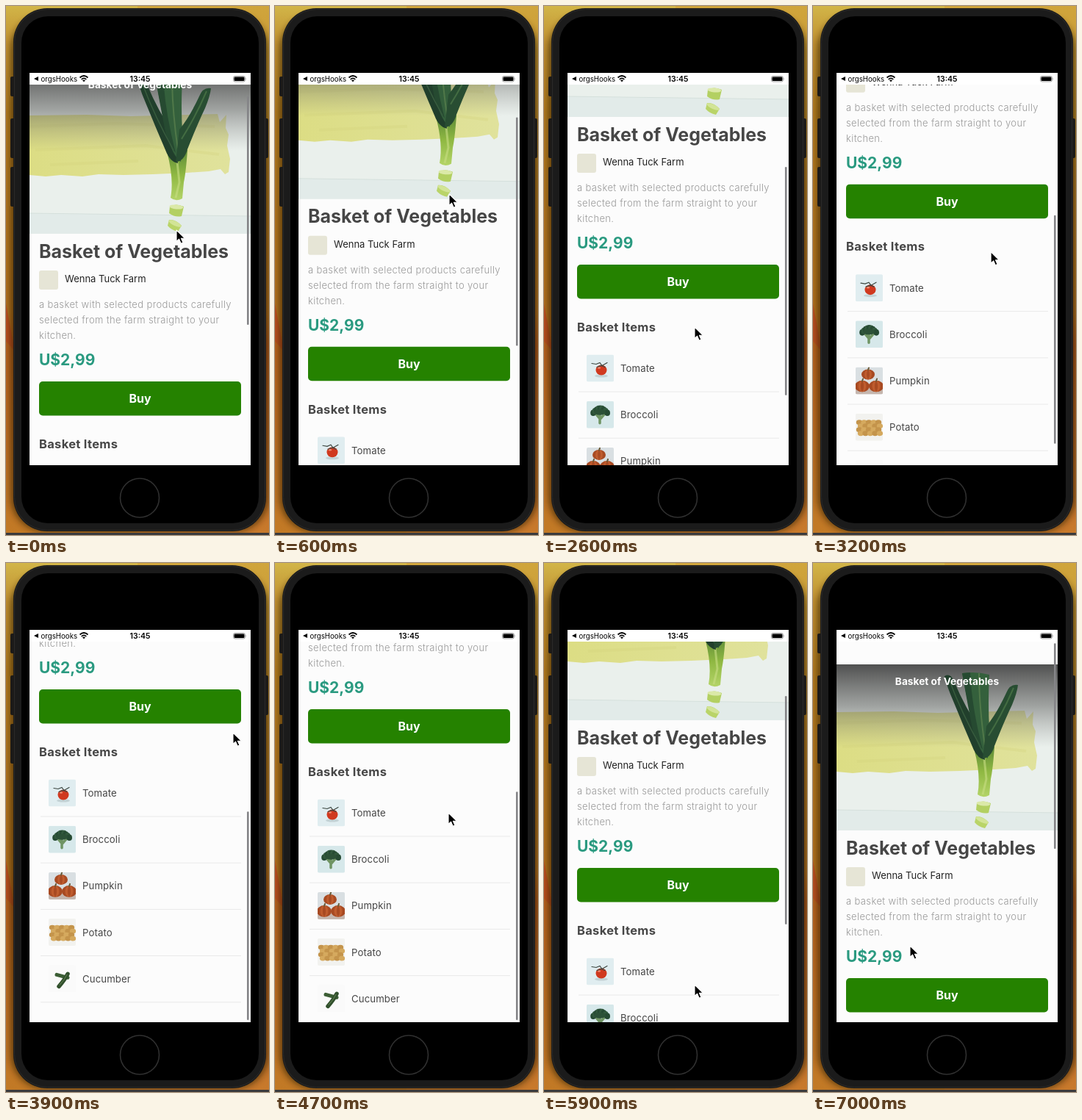
These frames come from a looping animation (358 px wide and 720 px high, 7100 ms). An HTML page:

```html
<!DOCTYPE html>
<html lang="en">
<head>
<meta charset="utf-8">
<title>Basket of Vegetables</title>
<style>
html, body { margin: 0; width: 100%; height: 100%; overflow: hidden; background: #000; }
svg { display: block; width: 358px; height: 720px; }
text { font-family: Inter, sans-serif; }
</style>
</head>
<body>
<svg viewBox="0 0 358 720" xmlns="http://www.w3.org/2000/svg">
  <defs>
    <linearGradient id="wallL" x1="0" y1="0" x2="0" y2="1">
      <stop offset="0" stop-color="#d2b548"/><stop offset=".07" stop-color="#c09030"/>
      <stop offset=".2" stop-color="#b07a1e"/><stop offset=".58" stop-color="#b06f1c"/>
      <stop offset=".63" stop-color="#b5601c"/><stop offset="1" stop-color="#c27a26"/>
    </linearGradient>
    <linearGradient id="wallR" x1="0" y1="0" x2="0" y2="1">
      <stop offset="0" stop-color="#d0a53c"/><stop offset=".3" stop-color="#b98226"/>
      <stop offset=".58" stop-color="#b87422"/><stop offset=".64" stop-color="#b3591f"/>
      <stop offset="1" stop-color="#c87a2c"/>
    </linearGradient>
    <linearGradient id="shade" x1="0" y1="0" x2="0" y2="1">
      <stop offset="0" stop-color="#484848" stop-opacity=".95"/>
      <stop offset=".25" stop-color="#555" stop-opacity=".5"/>
      <stop offset=".5" stop-color="#777" stop-opacity="0"/>
    </linearGradient>
    <linearGradient id="stem" x1="0" y1="0" x2="0" y2="1">
      <stop offset="0" stop-color="#5d8a38"/><stop offset=".5" stop-color="#8fb842"/>
      <stop offset="1" stop-color="#b4d468"/>
    </linearGradient>
    <linearGradient id="paint" x1="0" y1="0" x2="1" y2="0">
      <stop offset="0" stop-color="#dcdd84"/><stop offset="1" stop-color="#e0e29c"/>
    </linearGradient>
    <filter id="soft" x="-20%" y="-20%" width="140%" height="140%"><feGaussianBlur stdDeviation="4"/></filter>
    <clipPath id="view"><rect x="32" y="107" width="301" height="518"/></clipPath>
    <clipPath id="photo"><rect x="32" y="84" width="301" height="226"/></clipPath>
    <clipPath id="thumb"><rect width="37" height="37" rx="2"/></clipPath>
  </defs>

  <!-- wallpaper -->
  <rect width="179" height="720" fill="url(#wallL)"/>
  <rect x="179" width="179" height="720" fill="url(#wallR)"/>
  <path d="M0 405L12 470L0 456Z" fill="#b84e1e"/>
  <rect x="6" y="12" width="352" height="704" rx="48" fill="#2a1a04" opacity=".6" filter="url(#soft)"/>
  <rect y="717" width="358" height="3" fill="#3a3a3c"/>

  <!-- phone -->
  <g fill="#1c1a18">
    <rect x="6" y="96" width="6" height="27" rx="2"/>
    <rect x="6" y="153" width="6" height="54" rx="2"/>
    <rect x="6" y="219" width="6" height="54" rx="2"/>
    <rect x="352" y="153" width="5" height="54" rx="2"/>
  </g>
  <rect x="10" y="3" width="344" height="712" rx="46" fill="#1b1b1b"/>
  <rect x="11.500" y="4.500" width="341" height="709" rx="45" fill="none" stroke="#2b2a29"/>
  <rect x="21" y="14" width="323" height="690" rx="36" fill="#000"/>
  <circle cx="182" cy="669.500" r="26.500" fill="#000" stroke="#303030" stroke-width="1.600"/>

  <rect x="32" y="91" width="301" height="534" fill="#fcfcfc"/>
  <g clip-path="url(#view)">
    <g id="page">
      <g clip-path="url(#photo)">
        <rect x="32" y="84" width="301" height="226" fill="#eaf0ec"/>
        <path d="M32 282L333 286V310H32Z" fill="#e2ebe9"/>
        <path d="M32 282L333 286" stroke="#d5e0dc"/>
        <path d="M32 149L110 148L170 150L288 147L291 158L300 148L299 166L303 175L301 190L305 208L303 226L298 229L292 222L276 225L246 227L200 229L160 230L126 229L104 232L75 230L54 232L32 230Z" fill="url(#paint)"/>
        <path d="M32 164L150 160L284 164M40 196L190 190L290 202M60 216L180 211" fill="none" stroke="#cfd07a" stroke-width="4" opacity=".3"/>
        <rect x="32" y="84" width="301" height="226" fill="url(#shade)"/>
        <g id="leek">
          <path d="M219 198L247 196Q245 226 242 240L240 262Q231 267 224 261Q229 236 219 198Z" fill="url(#stem)"/>
          <path d="M233 212L236 240L231 261" fill="none" stroke="#c8de84" stroke-width="3" opacity=".6"/>
          <path d="M179 100Q187 95 192 107Q207 143 229 175L234 214Q223 212 217 196Q204 166 191 134Q183 116 179 100Z" fill="#213f2c"/>
          <path d="M203 96Q222 93 240 98Q238 138 240 170L238 212Q227 204 219 176Q210 133 203 96Z" fill="#34603c"/>
          <path d="M203 96L214 95Q216 142 231 200Q222 190 217 172Q209 130 203 96Z" fill="#264a31"/>
          <path d="M226 96Q226 140 234 196" fill="none" stroke="#507849" stroke-width="2"/>
          <path d="M279 112Q268 110 263 123Q250 151 236 168L231 212Q242 212 247 195Q260 162 271 139Q278 122 279 112Z" fill="#284d32"/>
          <path d="M273 116Q259 149 239 181" fill="none" stroke="#436c42" stroke-width="2"/>
          <path d="M185 104Q202 150 228 196" fill="none" stroke="#385c3e" stroke-width="1.500"/>
          <path d="M223 273Q231 268 242 273L239 286Q230 288 222 282Z" fill="#b3d062"/>
          <ellipse cx="232" cy="273.500" rx="9.500" ry="3" transform="rotate(5 232 273)" fill="#dbe9a8"/>
          <path d="M222 291Q231 290 239 299L234 307Q225 305 220 299Z" fill="#b9d468"/>
          <ellipse cx="230" cy="296" rx="9.500" ry="3" transform="rotate(25 230 296)" fill="#d2e496"/>
        </g>
      </g>
      <text x="182.500" y="112" font-size="13.700" font-weight="700" fill="#fff" text-anchor="middle">Basket of Vegetables</text>
      <text x="45" y="342.500" font-size="25" font-weight="700" fill="#464646">Basket of Vegetables</text>
      <rect x="45" y="360" width="26" height="26" rx="3" fill="#e6e5d6"/>
      <text x="80" y="376" font-size="13" fill="#222">Wenna Tuck Farm</text>
      <g font-size="13" font-weight="300" fill="#999" letter-spacing=".37">
        <text x="45" y="411">a basket with selected products carefully</text>
        <text x="45" y="432">selected from the farm straight to your</text>
        <text x="45" y="453">kitchen.</text>
      </g>
      <text x="45" y="489" font-size="21" font-weight="700" fill="#2a9a80">U$2,99</text>
      <rect x="45" y="511" width="275" height="46.500" rx="5" fill="#258200"/>
      <text x="182.500" y="540" font-size="16" font-weight="700" fill="#fff" text-anchor="middle">Buy</text>
      <text x="45" y="601.800" font-size="16.500" font-weight="700" fill="#464646" letter-spacing=".3">Basket Items</text>
      <g id="items"></g>
    </g>
  </g>
  <rect id="bar" x="328" width="2.600" rx="1.300" fill="#858588"/>

  <!-- status bar -->
  <rect x="32" y="91" width="301" height="16" fill="#fff"/>
  <path d="M38 99L44 96V102Z"/>
  <text x="47.500" y="102.500" font-size="9.700">orgsHooks</text>
  <path d="M100.500 97.500Q106 92.500 111.500 97.500M102.700 100Q106 96.800 109.300 100" fill="none" stroke="#000" stroke-width="1.700"/>
  <path d="M104 101.200Q106 99.800 108 101.200L106 103.300Z"/>
  <text x="182.500" y="102.800" font-size="10.500" font-weight="600" text-anchor="middle">13:45</text>
  <rect x="309.500" y="95.500" width="16" height="7.500" rx="2.200" fill="none" stroke="#888" stroke-width=".8"/>
  <rect x="310.500" y="96.500" width="14" height="5.500" rx="1.300"/>
  <path d="M326.700 98Q328.200 99.200 326.700 100.500Z" fill="#888"/>

  <path id="cursor" d="M0 0V15.500L3.600 12.200L6.200 18.200L9 17L6.400 11.200H11.300Z" fill="#000" stroke="#fff" stroke-width="1.100" stroke-linejoin="round"/>
</svg>
<script>
const $ = id => document.getElementById(id);
const LOOP = 7100, STEP = 100;
const TOP = -23, BOTTOM = 312, BAR = 311;

const dot = (x, y, rx, ry, fill) => `<ellipse cx="${x}" cy="${y}" rx="${rx}" ry="${ry}" fill="${fill}"/>`;
const line = (d, color, w) => `<path d="${d}" fill="none" stroke="${color}" stroke-width="${w}" stroke-linecap="round"/>`;

const pumpkin = (x, y, r) => dot(x, y, r, r * .78, '#a84a22') +
  dot(x, y, r * .55, r * .76, '#bf5c2e') + dot(x, y, r * .2, r * .7, '#a84a22') +
  line(`M${x} ${y - r * .7}l1 -3`, '#6a5a38', 2);

function potatoes() {
  let out = '';
  for (let row = 0; row < 4; row++)
    for (let i = 0; i < 5; i++)
      out += dot(5 + i * 6.5 + row % 2 * 2, 12 + row * 5, 4.2, 3.4, (i + row) % 2 ? '#d5a95e' : '#c4944b');
  return out;
}

function broccoli() {
  let out = line('M18 18L18 30M13 18L18 24M25 17L19 24', '#6f9463', 3.5);
  for (let i = 0; i < 9; i++)
    out += dot(9 + i * 2.4, 16 - 6 * Math.sin(i / 8 * Math.PI), 3.8, 4.3, i % 2 ? '#32593d' : '#264a33');
  return out + dot(18, 15, 8, 4, '#2c5137');
}

const items = [
  ['Tomate', '#e0edf0', dot(20, 29, 9, 2, '#c3d2d5') + dot(20, 21, 7.5, 7, '#d0391f') + dot(17, 18, 2, 1.3, '#ee8a70') +
    line('M7 12L13 13L18 11L21 15L28 11M14 17L20 15L25 17', '#3b4640', 1.2)],
  ['Broccoli', '#d6e8ea', broccoli()],
  ['Pumpkin', '#d9dfe2', '<rect y="29" width="37" height="8" fill="#c5b6ae"/>' + pumpkin(17, 10, 9) + pumpkin(9, 26, 10) + pumpkin(28, 26, 10)],
  ['Potato', '#f2f2ef', potatoes()],
  ['Cucumber', '#fafafa', line('M11 13L26 17', '#3c5e35', 5) + line('M26 12Q22 20 14 29', '#31502d', 5.5) + line('M25 13Q21 21 15 27', '#668553', 1)]
];

$('items').innerHTML = items.map(([name, bg, art], i) => {
  const y = 652 + i * 63.2;
  return `<g transform="translate(58 ${y - 18.5})" clip-path="url(#thumb)"><rect width="37" height="37" fill="${bg}"/>${art}</g>
    <text x="104" y="${y + 5}" font-size="13.2" fill="#464646" letter-spacing=".1">${name}</text>
    <path d="M47 ${y + 32}H320" stroke="#e9e9e9"/>`;
}).join('');

// time, scroll, pointer x, pointer y
const keys = [
  [0, 0, 232, 305], [1200, 88, 240, 214], [1500, 100, 240, 202],
  [2100, 104, 206, 492], [2600, 159, 205, 437], [3500, 312, 270, 284],
  [3900, 339, 309, 231], [4300, 312, 250, 330], [4700, 312, 236, 340],
  [4850, 311, 233, 358], [5900, 96, 205, 574], [6050, 88, 200, 579],
  [6450, 86, 140, 357], [6800, -23, 135, 465], [7000, -54, 132, 521]
];

const slope = (i, c) => (keys[i + 1][c] - keys[i][c]) / (keys[i + 1][0] - keys[i][0]);

// monotone tangent: flat at turning points
function tangent(i, c) {
  if (i === 0) return slope(0, c);
  if (i === keys.length - 1) return slope(i - 1, c);
  const a = slope(i - 1, c), b = slope(i, c);
  return a * b > 0 ? 2 * a * b / (a + b) : 0;
}

function at(t, c) {
  let i = 0;
  while (i < keys.length - 2 && t >= keys[i + 1][0]) i++;
  const h = keys[i + 1][0] - keys[i][0], u = Math.min(1, (t - keys[i][0]) / h), v = 1 - u;
  return v * v * (1 + 2 * u) * keys[i][c] + u * u * (3 - 2 * u) * keys[i + 1][c] +
    h * u * v * (v * tangent(i, c) - u * tangent(i + 1, c));
}

function draw(now) {
  const t = Math.floor(now % LOOP / STEP) * STEP;
  const s = at(t, 1);
  const inside = Math.max(TOP, Math.min(BOTTOM, s));
  const over = Math.abs(s - inside);
  const top = 123 + .603 * inside + (s > BOTTOM ? over : 0);
  $('page').setAttribute('transform', `translate(0 ${-s})`);
  $('bar').setAttribute('y', top);
  $('bar').setAttribute('height', BAR - over);
  $('cursor').setAttribute('transform', `translate(${at(t, 2)} ${at(t, 3)})`);
}

const start = performance.now();
function tick() {
  draw(performance.now() - start);
  requestAnimationFrame(tick);
}
tick();
</script>
</body>
</html>
```
